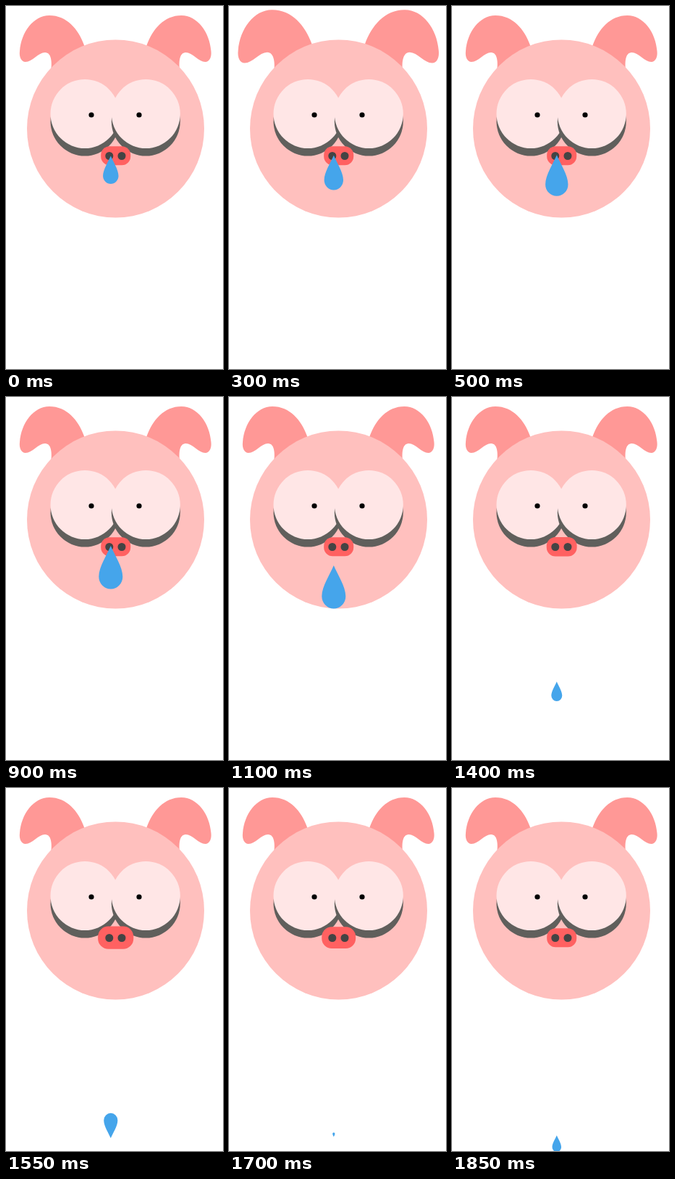
These frames come from a looping animation (300 px wide and 500 px high, 1900 ms). An HTML page:

```html
<!DOCTYPE html>
<html lang="en">
<head>
<meta charset="utf-8">
<title>Pig with a runny nose</title>
<style>
  html, body { margin: 0; width: 100%; height: 100%; overflow: hidden; background: #fff; }
  svg { display: block; width: 300px; height: 500px; }
</style>
</head>
<body>
<svg viewBox="0 0 300 500">
  <defs>
    <path id="ear" fill="#ff9896" d="M27 77C21 77 18 70 19 62C21 36 38 13 60 13C84 13 100 32 108 54L110 70L62 90C64 78 63 64 54 64C45 64 36 77 27 77Z"/>
    <g id="eye">
      <circle cy="10.5" r="47.5" fill="#605f5c"/>
      <circle r="47.5" fill="#ffe6e6"/>
    </g>
  </defs>
  <use href="#ear"/>
  <g transform="translate(302.5) scale(-1 1)"><use href="#ear"/></g>
  <circle cx="151.5" cy="169" r="122.5" fill="#ffc0be"/>
  <use href="#eye" x="109" y="148.5"/>
  <use href="#eye" x="193.3" y="148.5"/>
  <circle cx="118" cy="150" r="3.6"/>
  <circle cx="184" cy="150" r="3.6"/>
  <rect id="nose" x="-20.5" y="-13" width="41" height="26" rx="12" fill="#ff6161"/>
  <g fill="#444">
    <circle cx="142.8" cy="206.5" r="5.5"/>
    <circle cx="160" cy="206.5" r="5.5"/>
  </g>
  <path id="drop" fill="#45a5eb" d="M0 -4C5 8 16.5 25 16.5 38.5A16.5 17 0 0 1 -16.5 38.5C-16.5 25 -5 8 0 -4Z"/>
</svg>
<script>
  const LOOP = 1900, STEP = 50;
  const [ear, nose, drop] = ["ear", "nose", "drop"].map(id => document.getElementById(id));

  const part = (t, from, to) => Math.min(1, Math.max(0, (t - from) / (to - from)));
  const ease = p => (1 - Math.cos(Math.PI * p)) / 2;
  const pulse = (t, from, to) => ease(2 * part(t, from, to));

  // The drop swells, falls, then flips over twice as it shrinks.
  function dropScale(t) {
    if (t < 1300) return 0.65 + 0.35 * ease(part(t, 0, 660));
    if (t < 1550) return 1 - 1.58 * ease(part(t, 1300, 1550));
    return -0.58 + 0.96 * ease(part(t, 1550, 1850));
  }

  function draw(t) {
    const earScale = 1 + 0.16 * pulse(t, 0, 500);
    const noseScale = 1 + 0.22 * pulse(t, 1350, 1850);
    const y = 209 + 271 * part(t, 900, 1500) ** 2.1;
    ear.setAttribute("transform", `translate(63 66) scale(${earScale}) translate(-63 -66)`);
    nose.setAttribute("transform", `translate(151.7 206.2) scale(${noseScale})`);
    drop.setAttribute("transform", `translate(144.8 ${y}) scale(${dropScale(t)})`);
  }

  function tick() {
    draw(Math.floor(performance.now() % LOOP / STEP) * STEP);
    requestAnimationFrame(tick);
  }
  tick();
</script>
</body>
</html>
```
